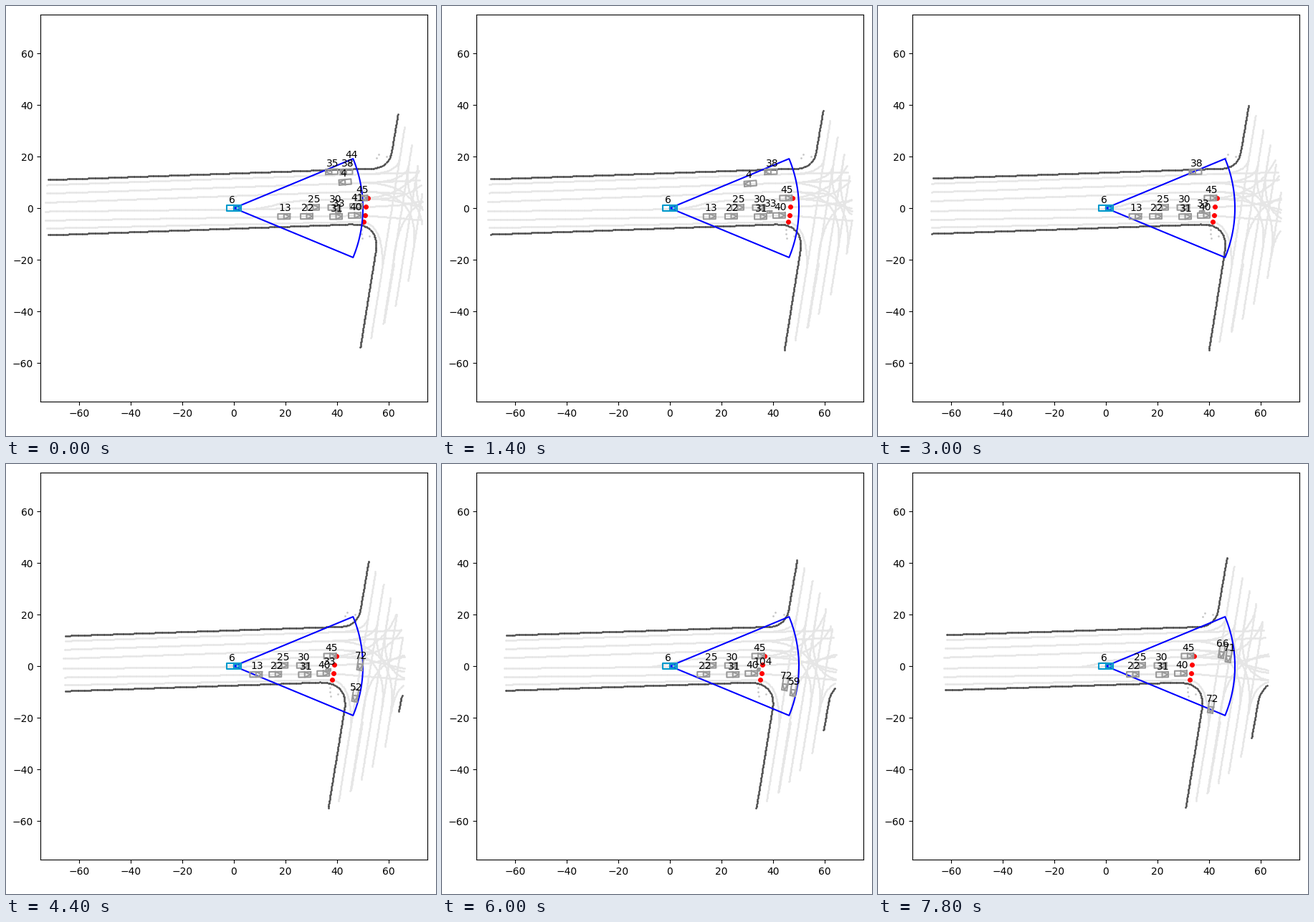
Recreate the animation shown at these times as a matplotlib script. Size 600 by 600 pixels, loop 8000 ms.

```python
import numpy as np
import matplotlib.pyplot as plt
from matplotlib.animation import FuncAnimation

FRAMES, STEP = 40, 200
VIEW, HALF_ANGLE = 50, np.pi / 8
TILT = 0.159                      # sideways lean of the cross street
LANE, EDGE, WALK = "#e6e6e6", "#505050", "#c8c8c8"
CAR, EGO = (0.6, 0.6, 0.6), (0.0, 0.6, 0.8)
EAST, WEST = 0.012, np.pi + 0.03
SOUTH = np.arctan2(-1, -TILT)


def dense(points, gap=0.5):
    """Evenly spaced points along a polyline."""
    p = np.array(points, float)
    d = np.r_[0, np.cumsum(np.hypot(*np.diff(p, axis=0).T))]
    s = np.arange(0, d[-1], gap)
    return np.c_[np.interp(s, d, p[:, 0]), np.interp(s, d, p[:, 1])]


def bend(a, c, b):
    """Quadratic curve from a to b pulled towards c."""
    t = np.linspace(0, 1, 30)[:, None]
    a, c, b = map(np.array, (a, c, b))
    return dense((1 - t) ** 2 * a + 2 * t * (1 - t) * c + t ** 2 * b)


def cross(x, low=-62, high=52):
    return dense([(x + TILT * (y + 5), y) for y in (low, high)])


def travel(t):
    """Distance driven by the ego car, which is slowing down."""
    return 3.39 * t - 0.1425 * t * t


# road map, in the ego frame at time zero
lanes = [
    dense([(-76, 8.9), (50, 13.3), (84, 14.2)]),
    dense([(-76, 5.6), (50, 9.9), (84, 11.4)]),
    dense([(-76, 2.1), (50, 6.6), (66, 5.6)]),
    dense([(-76, -1.3), (7.5, -0.3), (51, 0.5), (64, 1.2), (84, 4.8)]),
    dense([(-76, -4.75), (51, -2.8), (84, -5.5)]),
    dense([(-76, -7.85), (50, -5.2)]),
    dense([(7.5, -0.3), (13, 0.6), (19, 2.2), (25, 2.9), (52, 3.9),
           (62, 3), (84, -2.2)]),
    dense([(62, -21.5), (57.4, -49)]),
    bend((49, -5.2), (57.5, -5.2), (57.5, -22)),
    bend((64, 18.5), (62.5, 13.2), (50, 13.3)),
    bend((67.5, 16), (65.5, 9.9), (50, 9.9)),
    bend((50, 3.9), (68, 4.5), (75, 20)),
    bend((50, 3.9), (73, 2), (78.5, 18)),
    bend((67.7, 17), (64.5, -3), (84, -2.3)),
    bend((71.5, 18), (67, -5), (84, -5.5)),
    bend((69.5, -16), (72.5, 6.6), (50, 6.6)),
    bend((73, -17), (76, 10), (50, 9.9)),
    bend((84, 5), (64, 5), (61.8, -20)),
    bend((84, 11.4), (78, 11.5), (79, 22)),
    bend((73, -18), (75, -5), (84, -5.5)),
] + [cross(x) for x in (60.3, 64.2, 67.8, 71.2, 74.9)]

edges = [
    dense([(-76, 10.85), (36, 14.8), (48, 15.2), (54.2, 15.4)]),
    bend((54.2, 15.4), (60.3, 16.2), (61.2, 22.5)),
    dense([(61.2, 22.5), (65.2, 46)]),
    dense([(-76, -10.55), (38, -6.5), (45.5, -6.2), (49, -6.5)]),
    bend((49, -6.5), (55.5, -8), (55.1, -15.5)),
    dense([(55.1, -15.5), (48, -60)]),
    dense([(72.5, -38), (76.8, -13.3)]),
    bend((76.8, -13.3), (77.6, -9.2), (81, -6.7)),
]

walks = np.array([(55.3, 19.4), (56.1, 20.8), (59.2, 20), (49.4, -8.3),
                  (49.4, -10), (49.7, -11.7), (52.5, -10.8)])
lights = np.array([(52, 3.9), (51.1, 0.5), (50.8, -2.8), (50.2, -5.2)])

layers = [(np.vstack(lanes), LANE), (walks, WALK), (np.vstack(edges), EDGE)]


class Car:
    def __init__(self, ax, name, x, y, size=(4.7, 2.0), heading=EAST,
                 v=(0, 0), span=(0, 99), color=CAR):
        self.pos, self.v, self.span = np.array([x, y]), np.array(v), span
        u = np.array([np.cos(heading), np.sin(heading)])
        n = np.array([-u[1], u[0]])
        f, s = size[0] / 2 * u, size[1] / 2 * n
        self.box = np.array([f + s, f - s, -f - s, s - f, f + s])
        self.arrow = np.array([s, -s, f, s])
        self.lines = [ax.plot([], [], color=color, zorder=4)[0]
                      for _ in range(2)]
        self.label = ax.text(0, 0, name, zorder=10)

    def place(self, p, seen=True):
        for line, shape in zip(self.lines, (self.box, self.arrow)):
            line.set_data(*(shape + p).T)
            line.set_visible(seen)
        self.label.set_position(p + [-2, 2])
        self.label.set_visible(seen)

    def update(self, t):
        p = self.pos + self.v * t - [travel(t), 0]
        seen = (self.span[0] <= t < self.span[1]
                and np.hypot(*p) < VIEW
                and abs(np.arctan2(p[1], p[0])) < HALF_ANGLE)
        self.place(p, seen)


fig = plt.figure(figsize=(6, 6), dpi=100)
ax = fig.add_axes([0.08, 0.08, 0.9, 0.9])
ax.set(xlim=(-75, 75), ylim=(-75, 75),
       xticks=range(-60, 61, 20), yticks=range(-60, 61, 20))

dots = [ax.plot([], [], ".", color=c, ms=2)[0] for _, c in layers]
lamps = ax.plot([], [], "o", color="red", ms=4)[0]
arc = np.linspace(-HALF_ANGLE, HALF_ANGLE, 60)
ax.plot(np.r_[0, VIEW * np.cos(arc), 0], np.r_[0, VIEW * np.sin(arc), 0],
        color="blue")

Car(ax, "6", 0, 0, (5.3, 2.2), 0, color=EGO).place(np.zeros(2))

cars = [Car(ax, name, x, y) for name, x, y in [
    ("22", 28.2, -3.2), ("25", 30.7, 0.25), ("30", 38.9, 0.25),
    ("31", 39.6, -3.3), ("40", 46.8, -2.85), ("45", 49.4, 3.9)]]
cars += [
    Car(ax, "13", 19.4, -3.25, v=(0.3, 0)),
    Car(ax, "41", 47.4, 0.7, span=(0, 0.9)),
    Car(ax, "35", 37.9, 14.1, heading=WEST),
    Car(ax, "38", 43.6, 14.1, heading=WEST),
    Car(ax, "4", 43.1, 10.1, heading=WEST + 0.05, v=(-5.33, -0.4)),
    Car(ax, "44", 45.1, 17.4, (0.6, 0.6)),
    Car(ax, "33", 40.4, -1.5, (1.8, 0.8), v=(1.9, 0), span=(0, 5.3)),
    Car(ax, "104", 46.0, -1.4, (0.9, 0.9), v=(0.6, 0), span=(5.3, 7.5)),
]
cars += [Car(ax, name, x, y, heading=SOUTH, v=(-TILT * v, -v))
         for name, x, y, v in [
    ("72", 64.55, 22.2, 4.87), ("52", 62.55, 9.7, 4.8),
    ("59", 68.1, 22.3, 5.25), ("55", 71.85, 23.8, 4.8),
    ("66", 68.7, 43.5, 4.87), ("71", 71.8, 44.45, 5.2)]]


def update(i):
    t = i * STEP / 1000
    s = travel(t)
    turn = -0.003 * (s / 17.8) ** 2
    radius = 73.2 - 0.57 * s
    c, k = np.cos(turn), np.sin(turn)
    for (points, _), line in zip(layers, dots):
        x, y = points[:, 0] - s, points[:, 1]
        x, y = c * x - k * y, k * x + c * y
        near = np.hypot(x, y) < radius
        line.set_data(x[near], y[near])
    lamps.set_data(lights[:, 0] - s, lights[:, 1])
    for car in cars:
        car.update(t)


anim = FuncAnimation(fig, update, frames=FRAMES, interval=STEP,
                     init_func=lambda: update(0), repeat=True, repeat_delay=0)
plt.show()
```
